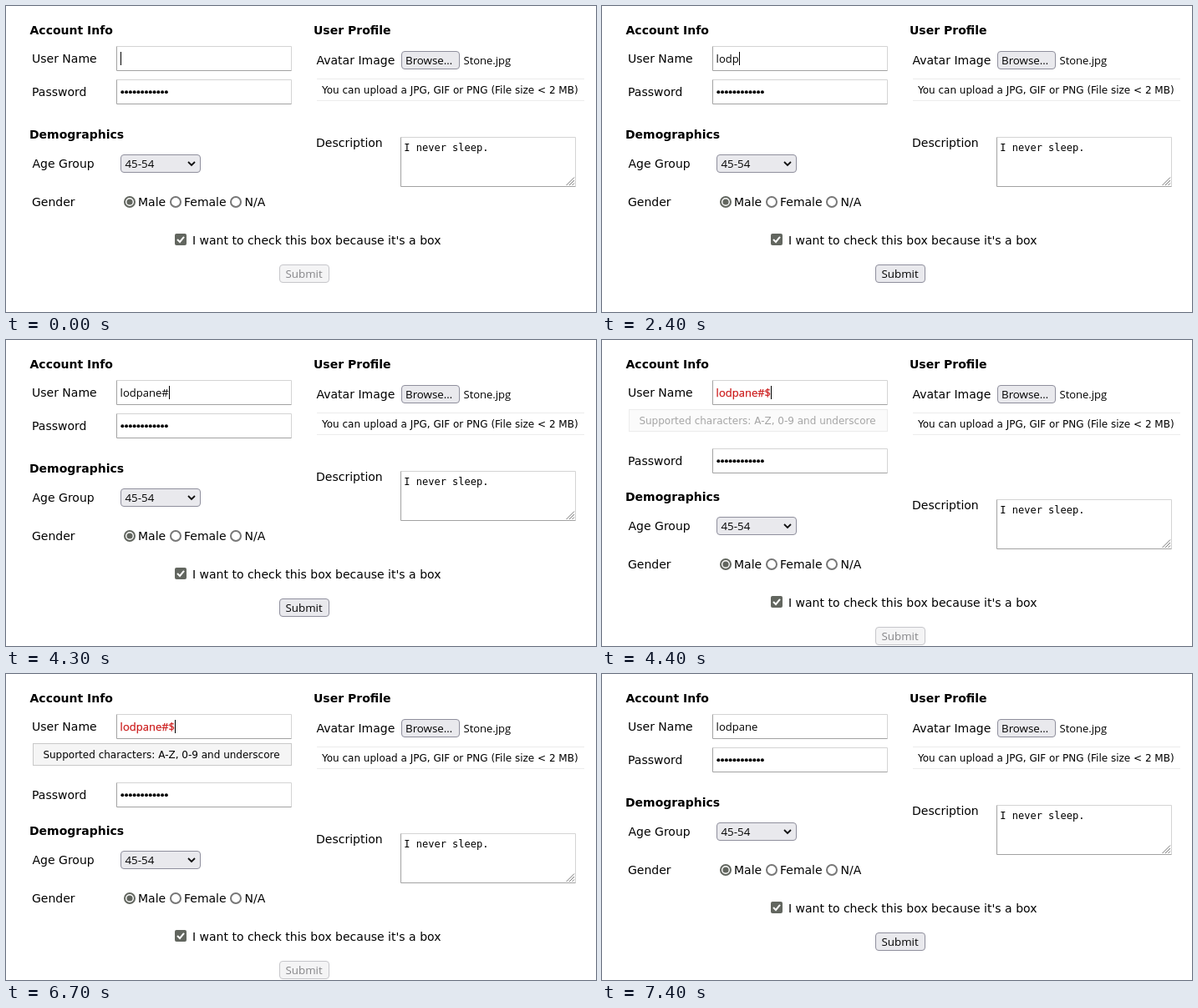
Recreate the animation shown at these times as an HTML page. Size 706 px wide and 367 px high, loop 8 s.

```html
<!DOCTYPE html>
<html lang="en">
<head>
<meta charset="utf-8">
<title>Form validation</title>
<style>
  html, body { margin: 0; width: 100%; height: 100%; overflow: hidden; background: #fff; }
  svg { display: block; }
  text { font: 14px "DejaVu Sans", sans-serif; fill: #000; white-space: pre; }
  .head { font-weight: bold; }
  .small { font-size: 12px; }
  .ui { font: 13px "Open Sans", "Noto Sans", sans-serif; }
  .btn { font-size: 13.33px; }
  .mono { font: 12px "DejaVu Sans Mono", monospace; }
  .control { fill: #e9e9ed; stroke: #8f8f9d; }
  .field { fill: #fff; stroke: none; }
  .light { fill: none; stroke: #d4d4d4; }
  .dark { fill: none; stroke: #a2a2a2; }
  .rule { stroke: #ececec; }
  .radio { fill: #fff; stroke: #777; stroke-width: 2; }
  .accent { fill: #62665f; }
  .bad { fill: #cc1c1c; stroke: #cc1c1c; stroke-width: .25px; }
  .fixing { fill: #d00000; }
  .off .control { fill: #f4f4f5; stroke: #c6c6ca; }
  .off text { fill: #858588; }
</style>
</head>
<body>
<svg id="stage" width="706" height="367" viewBox="0 0 706 367">
  <text class="head" x="28.5" y="34">Account Info</text>
  <text x="31" y="68">User Name</text>
  <g data-field="132 48 210 30"></g>
  <text id="name" class="ui" x="136.6" y="68"></text>
  <rect id="caret" y="55" width="1" height="16"/>

  <g id="tip">
    <rect x="32.5" y="83.5" width="309" height="26" fill="#f5f5f5" stroke="#c9c9c9"/>
    <text class="small" x="44.4" y="101">Supported characters: A-Z, 0-9 and underscore</text>
  </g>

  <g id="password">
    <text x="31" y="108">Password</text>
    <g data-field="132 88 210 30"></g>
    <g id="dots"></g>
  </g>

  <text class="head" x="368" y="34">User Profile</text>
  <text x="371.5" y="70">Avatar Image</text>
  <rect class="control" x="473.5" y="54.5" width="69" height="21" rx="3.5"/>
  <text class="ui btn" x="478" y="70">Browse…</text>
  <text class="ui" x="547.5" y="70">Stone.jpg</text>
  <path class="rule" d="M372 87.5H692M372 113.5H692"/>
  <text class="small" x="378" y="105">You can upload a JPG, GIF or PNG (File size &lt; 2 MB)</text>

  <g id="lower">
    <text class="head" x="28" y="159">Demographics</text>
    <text x="31.5" y="194">Age Group</text>
    <rect class="control" x="137.5" y="178.5" width="95" height="21" rx="3.5"/>
    <text class="ui btn" x="142.5" y="194">45-54</text>
    <path d="M218 187l4 4 4-4" fill="none" stroke="#111" stroke-width="1.8"/>

    <text x="31" y="240">Gender</text>
    <circle class="radio" cx="148" cy="235" r="6" style="stroke:#62665f"/>
    <circle class="accent" cx="148" cy="235" r="3.6"/>
    <text x="158" y="240">Male</text>
    <circle class="radio" cx="203" cy="235" r="6"/>
    <text x="213" y="240">Female</text>
    <circle class="radio" cx="275" cy="235" r="6"/>
    <text x="285.5" y="240">N/A</text>

    <text x="371" y="169">Description</text>
    <g data-field="472 157 210 60"></g>
    <text class="mono" x="476.3" y="174">I never sleep.</text>
    <path d="M670.5 215L680 205.5M674 215L680 209M677.5 215L680 212.5" stroke="#777"/>

    <rect class="accent" x="202" y="273" width="14" height="14" rx="2"/>
    <path d="M205 280l3 3 5-6.2" fill="none" stroke="#fff" stroke-width="2"/>
    <text x="223" y="286">I want to check this box because it's a box</text>

    <g id="submit">
      <rect class="control" x="327.5" y="310.5" width="59" height="21" rx="3.5"/>
      <text class="ui btn" x="334.5" y="326">Submit</text>
    </g>
  </g>
</svg>
<script>
const LOOP = 8000;
const USER = "lodpane", EXTRA = "#$%^&", FULL = USER + EXTRA;
const $ = id => document.getElementById(id);

// Inset borders: light on top and right, dark on left and bottom.
for (const g of document.querySelectorAll("[data-field]")) {
  const [x, y, w, h] = g.dataset.field.split(" ").map(Number);
  const l = x + .5, t = y + .5, r = x + w - .5, b = y + h - .5;
  g.innerHTML = `<rect class="field" x="${x}" y="${y}" width="${w}" height="${h}"/>
    <path class="light" d="M${l} ${t}H${r}V${b}"/>
    <path class="dark" d="M${l} ${t}V${b}H${r}"/>`;
}

$("dots").innerHTML = Array.from({ length: 12 }, (_, i) =>
  `<circle cx="${139.3 + i * 4.78}" cy="103.2" r="1.95"/>`).join("");

// [time, typed characters, caret visible, tip opacity (null = closed), submit enabled]
const STEPS = [
  [0, 0, 1, null, 0],
  [1200, 0, 0, null, 0],
  [1600, 1, 1, null, 1],
  [1800, 2, 1, null, 1],
  [2000, 3, 1, null, 1],
  [2400, 4, 1, null, 1],
  [2500, 5, 1, null, 1],
  [2700, 6, 1, null, 1],
  [3000, 7, 1, null, 1],
  [3600, 7, 0, null, 1],
  [4300, 8, 1, null, 1],
  [4400, 9, 1, .35, 0],
  [4500, 10, 1, .7, 0],
  [4600, 12, 1, 1, 0],
  [4800, 12, 0, 1, 0],
  [6100, 11, 1, 1, 0],
  [6400, 10, 1, 1, 0],
  [6700, 9, 1, 1, 0],
  [6800, 8, 1, 1, 0],
  [7100, 7, 1, .65, 1],
  [7200, 7, 1, .3, 1],
  [7300, 7, 1, 0, 1],
  [7400, 7, 0, null, 1]
];

let shown;

function show([, count, caret, tip, enabled]) {
  const open = tip !== null;
  const name = $("name");
  name.textContent = FULL.slice(0, count);
  name.setAttribute("class", "ui" + (open ? (enabled ? " fixing" : " bad") : ""));
  const width = count ? name.getComputedTextLength() : 0;
  $("caret").setAttribute("x", Math.round(136.8 + width));
  $("caret").style.visibility = caret ? "visible" : "hidden";
  $("tip").style.opacity = tip || 0;
  $("password").setAttribute("transform", `translate(0 ${open ? 42 : 0})`);
  $("lower").setAttribute("transform", `translate(0 ${open ? 34 : 0})`);
  $("submit").setAttribute("class", enabled ? "" : "off");
}

function tick() {
  const t = performance.now() % LOOP;
  const step = STEPS.findLast(s => s[0] <= t);
  if (step !== shown) show(shown = step);
  requestAnimationFrame(tick);
}
tick();
</script>
</body>
</html>
```
